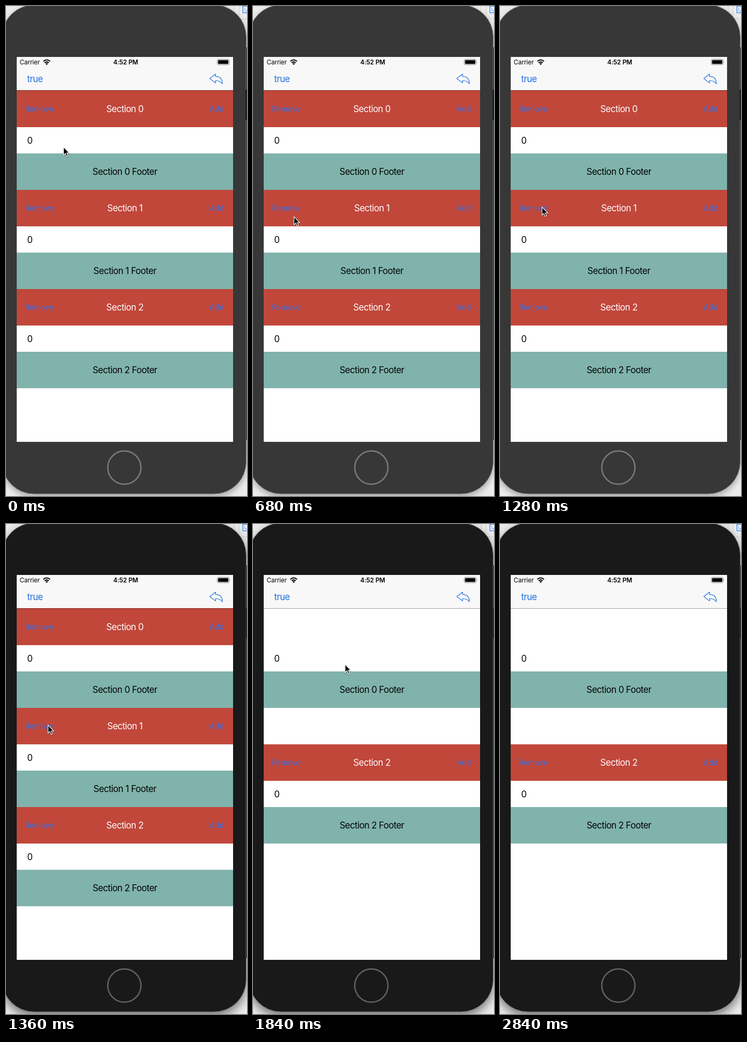
An HTML page for the animation above (2880 ms loop, 450 px wide and 914 px high).

```html
<!DOCTYPE html>
<html lang="en">
<head>
<meta charset="utf-8">
<title>Removing a section</title>
<style>
  html, body { margin: 0; width: 100%; height: 100%; overflow: hidden; background: #ececec; }
  svg { display: block; width: 450px; height: 914px; }
  text { font: 16.6px Inter, sans-serif; letter-spacing: -.5px; }
  .mid { text-anchor: middle; }
  .link { fill: #2270df; }
  .button { font-size: 14.6px; letter-spacing: -.3px; fill: #3a6bd8; }
  .status { font-size: 11.7px; letter-spacing: -.1px; }
  #phone { --body: #373737; --ring: #7b7b7b; --side: #202020;
    filter: drop-shadow(0 5px 6px rgba(0, 0, 0, .3)); }
  #phone.active { --body: #191919; --ring: #626262; --side: #2a2a2a;
    filter: drop-shadow(0 8px 9px rgba(0, 0, 0, .5)); }
</style>
</head>
<body>
<svg viewBox="0 0 450 914">
  <rect width="450" height="914" fill="#ececec"/>
  <path d="M426 0V24M435 0V24M426 24H450" stroke="#cfcfcf" fill="none"/>
  <path d="M450 .5H442.5V12.5H450" stroke="#3f86e8" stroke-width="1.5" fill="#fff"/>
  <path d="M446 3V9H450" stroke="#3f86e8" fill="none"/>
  <path d="M448 77H450V810H448Z" fill="#25262a"/>
  <path d="M448 838.5H450" stroke="#bbb"/>

  <g id="phone">
    <rect x="-7.5" y="-2" width="456" height="912" rx="60" fill="var(--body)" stroke="#777"/>
    <rect x="447" y="156" width="4" height="57" rx="1" fill="var(--side)"/>
    <circle cx="221" cy="861" r="31" fill="none" stroke="var(--ring)" stroke-width="2.5"/>
  </g>

  <rect x="20" y="95" width="404" height="718" fill="#fff"/>
  <g id="list"></g>
  <rect x="20" y="95" width="404" height="62" fill="#f8f8f8"/>
  <rect x="20" y="157" width="404" height="1" fill="#000" opacity=".36"/>

  <text class="status" x="25.5" y="109.3">Carrier</text>
  <g fill="none" stroke="#000" stroke-width="2.1">
    <path d="M69.8 103.2Q76 97.8 82.2 103.2M72.3 106Q76 102.8 79.7 106"/>
    <path d="M76 110L73.7 107.4Q76 105.7 78.3 107.4Z" fill="#000" stroke="none"/>
  </g>
  <text class="status mid" x="223.5" y="109.3" font-weight="600" style="font-weight:600">4:52 PM</text>
  <rect x="394.5" y="99.5" width="22" height="10" rx="2.2" fill="none" stroke="#777"/>
  <rect x="396" y="101" width="19" height="7" rx="1"/>
  <path d="M418 103Q419.8 104.5 418 106Z" fill="#777"/>

  <text class="link" x="39.6" y="142">true</text>
  <path d="M380.5 135.2L391.3 127V131.4C399.5 131.4 404 136.5 404 145.2C401 140.5 397.5 139.3 391.3 139.3V143.6Z"
        fill="none" stroke="#2270df" stroke-width="1.1" stroke-linejoin="round"/>

  <path id="cursor" d="M0 0V15L3.4 11.9L5.8 17.4L8.3 16.3L6 11H10.6Z"
        stroke="#fff" stroke-width="1.1" style="filter:drop-shadow(0 1px 1px rgba(0,0,0,.35))"/>
</svg>

<script>
const LOOP = 2880, ACTIVATE = 1320, REMOVE = 1400;
const phone = document.getElementById('phone');
const list = document.getElementById('list');
const cursor = document.getElementById('cursor');

const band = (y, color) => `<rect x="20" y="${y}" width="404" height="68" fill="${color}"/>`;
const label = (x, y, text, attrs = '') => `<text x="${x}" y="${y}" ${attrs}>${text}</text>`;

const header = (y, n) => band(y, '#c1473b')
  + label(35, y + 39.3, 'Remove', 'class="button"')
  + label(222, y + 40.3, `Section ${n}`, 'class="mid" fill="#fff"')
  + label(379.8, y + 39.3, 'Add', 'class="button"');

const body = (y, n) => label(39.5, y + 31.3, '0')
  + band(y + 49, '#80b3ac')
  + label(222, y + 89.3, `Section ${n} Footer`, 'class="mid"');

const section = (y, n) => header(y, n) + body(y + 68, n);

const fullList = band(157, '#c1473b') + [0, 1, 2].map(n => section(158 + n * 185.2 | 0, n)).join('');
const shortList = body(226, 0) + section(411, 2);

// Pointer stops: time, x, y; "smooth" eases into the stop
const stops = [
  { t: 0, x: 107.5, y: 263 },
  { t: 640, x: 76.5, y: 393, smooth: true },
  { t: 760, x: 76.5, y: 393 },
  { t: 1160, x: 78.5, y: 375, smooth: true },
  { t: 1560, x: 78.5, y: 375 },
  { t: 2120, x: 264.5, y: 150, smooth: true },
  { t: 2160, x: 264.5, y: 150 },
  { t: 2240, x: 208, y: 72 },
  { t: 2360, x: 4, y: -22 },
  { t: LOOP, x: 4, y: -22 }
];

function pointerAt(t) {
  const i = stops.findIndex(s => s.t > t);
  const a = stops[i - 1], b = stops[i];
  let k = (t - a.t) / (b.t - a.t);
  if (b.smooth) k = k * k * (3 - 2 * k);
  return [a.x + (b.x - a.x) * k, a.y + (b.y - a.y) * k];
}

let removed;
function draw(now) {
  const t = now % LOOP;
  phone.classList.toggle('active', t >= ACTIVATE);
  if (removed !== t >= REMOVE) {
    removed = t >= REMOVE;
    list.innerHTML = removed ? shortList : fullList;
  }
  cursor.setAttribute('transform', `translate(${pointerAt(t)})`);
}

const start = performance.now();
function frame() {
  draw(performance.now() - start);
  requestAnimationFrame(frame);
}
frame();
</script>
</body>
</html>
```
